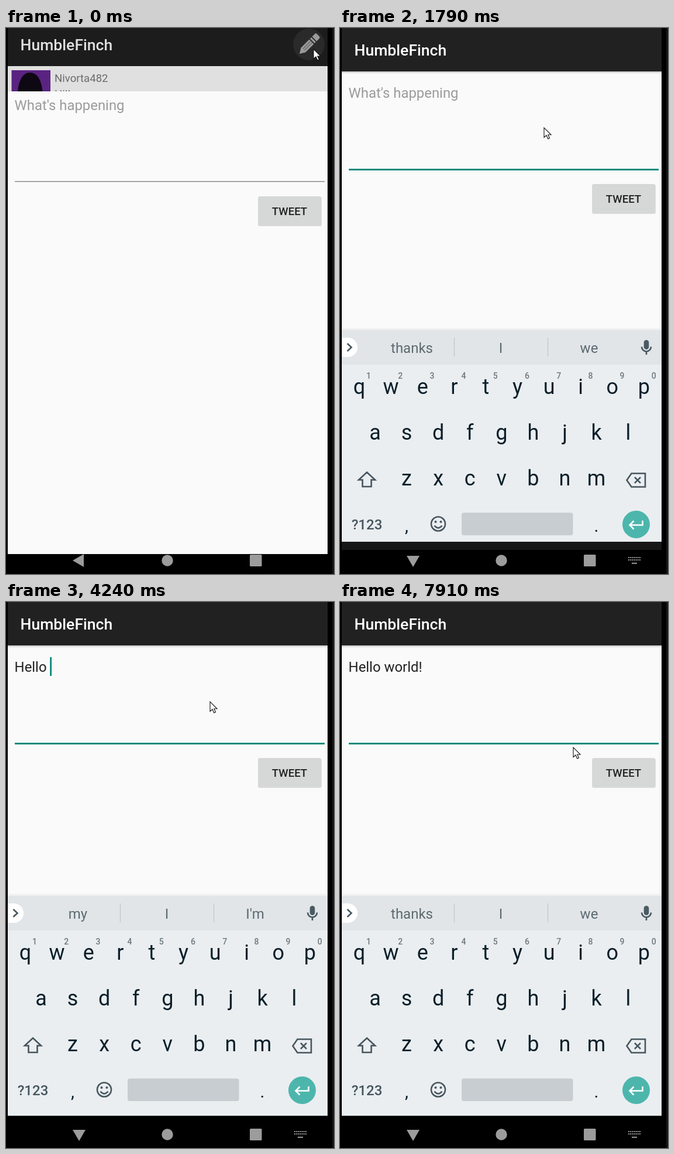
An HTML page for the animation above (8000 ms loop, 561 px wide and 931 px high).

```html
<!DOCTYPE html>
<html lang="en">
<head>
<meta charset="utf-8">
<title>Compose</title>
<style>
  html, body { margin: 0; width: 100%; height: 100%; overflow: hidden; background: #000; }
  svg { display: block; width: 100%; height: 100%; }
  text { font-family: Roboto, "Open Sans", sans-serif; white-space: pre; }
  .mid { text-anchor: middle; }
  .title { font-size: 26.6px; font-weight: 500; fill: #fff; }
  .body { font-size: 23.9px; }
  .small { font-size: 18.6px; }
  .key { font-size: 36px; fill: #0b1f29; }
  .digit { font-size: 14px; font-weight: 500; fill: #6b777d; }
  .hint { font-size: 24px; fill: #5c6a70; }
  .hint.best { font-weight: 700; fill: #000; }
  .line { fill: none; stroke: #47565e; stroke-width: 2.6; }
</style>
</head>
<body>
<svg viewBox="0 0 561 931" preserveAspectRatio="none">
  <defs>
    <clipPath id="reveal"><rect id="revealBox" x="0" width="561" height="931"/></clipPath>
    <clipPath id="screen"><rect x="3" width="547" height="931"/></clipPath>
    <linearGradient id="fade" x2="0" y2="1">
      <stop stop-color="#000" stop-opacity=".22"/>
      <stop offset="1" stop-color="#000" stop-opacity="0"/>
    </linearGradient>
  </defs>
  <rect width="561" height="931"/>

  <g clip-path="url(#screen)">
    <g id="feed">
      <rect x="3" y="65" width="547" height="811" fill="#e0e0e0"/>
      <rect x="3" width="547" height="65" fill="#1c1c1c"/>
      <text class="title" x="24.5" y="38" style="fill:#e0e0e0">HumbleFinch</text>
      <circle cx="518" cy="28" r="27" fill="#2a2a2a"/>
      <g transform="translate(502 44) rotate(-45)" fill="#9a9a9a">
        <path d="M0 0L9-5.5H29V5.5H9zM31-5.5h3v11h-3zM36-5.5h6q3 0 3 3v5q0 3-3 3h-6z"/>
        <path d="M10-1.8H29M10 1.8H29" stroke="#555"/>
      </g>
      <rect x="9.5" y="72" width="66.5" height="66" fill="#5a2382"/>
      <path d="M20 138C17 100 24 76 41 76S66 100 62 138z" fill="#0d0812"/>
      <text class="small" x="83" y="92" fill="#6c6c6c">Nivorta482</text>
      <text class="small" x="83" y="119" fill="#6c6c6c">Hi!!</text>
    </g>

    <g id="page"><g clip-path="url(#reveal)">
      <rect x="3" width="547" height="876" fill="#fafafa"/>
      <rect x="3" y="74" width="547" height="4" fill="url(#fade)"/>
      <rect x="3" width="547" height="74" fill="#212121"/>
      <text class="title" x="24.5" y="47">HumbleFinch</text>
      <text class="body" id="ask" x="14.6" y="119.3" fill="#9b9b9b">What's happening</text>
      <text class="body" id="typed" x="14.6" y="119.3" fill="#212121"></text>
      <rect id="under" y="121.3" height="1.4" fill="#212121"/>
      <rect id="caret" y="94" width="2.7" height="32" fill="#008577"/>
      <rect id="rule" x="15" width="530"/>
      <rect x="431" y="267" width="109" height="50" rx="3" fill="#000" opacity=".12"/>
      <rect x="431.5" y="266" width="107.5" height="49.5" rx="2.7" fill="#d6d7d7"/>
      <text class="small mid" x="485" y="297.7" font-weight="500" fill="#212121">TWEET</text>
    </g></g>

    <g id="board">
      <rect x="3" y="498" width="547" height="3" fill="#000" opacity=".04"/>
      <rect x="3" y="501" width="547" height="375" fill="#eaeef1"/>
      <rect x="3" y="501" width="547" height="59" fill="#e1e5e8"/>
      <path d="M3 514H13.500a16.500 16.500 0 0 1 0 33H3z" fill="#fff"/>
      <path class="line" d="M12.500 524l7 6.500-7 6.500"/>
      <path d="M195.500 514v32M355.500 514v32" stroke="#c4c9cd" stroke-width="1.4"/>
      <rect x="519.700" y="518" width="8.600" height="16" rx="4.300" fill="#4a5b64"/>
      <path class="line" d="M516 529.500a8 8 0 0 0 16 0M524 537.500v5.500" stroke-width="2.200"/>
      <g id="keys"></g>
      <path class="line" d="M46 743.500L60 756.500H53.500V768H38.500V756.500H32z"/>
      <path class="line" d="M490.500 757L498.500 745.500H522V768.500H498.500zM504 752l10 10M514 752l-10 10"/>
      <text class="hint mid" x="46" y="840.500" style="font-weight:500;fill:#47565e">?123</text>
      <text class="mid" x="114" y="845" font-size="30" fill="#0b1f29">,</text>
      <text class="mid" x="438.500" y="845" font-size="30" fill="#0b1f29">.</text>
      <circle class="line" cx="168" cy="831.500" r="12"/>
      <path class="line" d="M161.500 834.500q6.500 8 13 0"/>
      <g fill="#47565e"><circle cx="163.500" cy="828" r="2"/><circle cx="172.500" cy="828" r="2"/></g>
      <rect x="208" y="812.500" width="190.500" height="38.500" rx="4" fill="#c8cdd1"/>
      <circle cx="506.500" cy="832.500" r="23.500" fill="#4db6ac"/>
      <path d="M517.500 826v7.500H496M502.500 826.500l-7 7 7 7" fill="none" stroke="#fff" stroke-width="2.600"/>
    </g>
    <rect id="veil" x="3" y="594" width="547" height="282" fill="#fafafa"/>
    <rect id="scrim" x="3" y="876" width="547" height="55"/>
  </g>

  <g fill="#fff" opacity=".61">
    <path id="back"/>
    <circle cx="276" cy="908" r="9.700"/>
    <rect x="417" y="898" width="20.500" height="20" rx="1.500"/>
    <path id="dots" fill="none" stroke="#fff" stroke-width="2"/>
  </g>
  <rect x="558" width="3" height="931" fill="#161616"/>
  <path id="mouse" d="M0 0V16.500L4 13L6.800 19L9.500 17.800L6.800 12H12z" fill="#fff" stroke="#111" stroke-width="1.100"/>
</svg>

<script>
const $ = id => document.getElementById(id);
const set = (id, attrs) => { for (const k in attrs) $(id).setAttribute(k, attrs[k]); };
const show = (id, on) => set(id, { visibility: on ? 'visible' : 'hidden' });

const LOOP = 8000, LEFT = 14.6, STEP = 54.1;

// Keyboard letters, corner digits and the three suggestions
let keys = '';
const label = (cls, x, y, s) => keys += `<text class="${cls} mid" x="${x}" y="${y}">${s}</text>`;
['qwertyuiop', 'asdfghjkl', 'zxcvbnm'].forEach((row, r) =>
  [...row].forEach((c, i) => label('key', [33, 60, 114][r] + STEP * i, 610 + 78 * r, c)));
for (let i = 0; i < 10; i++) label('digit', 49 + STEP * i + i * .1, 583.5, (i + 1) % 10);
for (const x of [123, 275, 426]) label('hint', x, 540, '');
$('keys').innerHTML = keys;
const hints = document.querySelectorAll('#keys .hint');

let dots = 'M499 912.800h9';
for (let y = 903; y < 909; y += 4)
  for (let i = 0; i < 7; i++) dots += `M${493 + i * 3.15} ${y}h2`;
set('dots', { d: dots });

// Each step keeps the values of the one before; word = start of the underlined word
const steps = [
  [0, { y: 21, clip: 87, mouse: [526, 36], typed: '', word: -1, caret: 0, focus: 0,
        board: -1, veil: 0, scrim: 0, down: 0, hints: 'thanks I we', best: 0 }],
  [120, { y: 4, clip: 3, mouse: [522, 40] }],
  [270, { y: 1, clip: 0, mouse: [490, 68] }],
  [390, { y: 0, mouse: [432, 111] }],
  [540, { mouse: [352, 167] }],
  [690, { mouse: [349, 170] }],
  [810, { focus: 1 }],
  [930, { caret: 1 }],
  [1490, { caret: 0, down: 1 }],
  [1650, { board: 94, veil: .5, scrim: .52 }],
  [1790, { board: 14, veil: 0, scrim: .9 }],
  [1910, { board: 0, scrim: 1, caret: 1 }],
  [2340, { typed: 'H', word: 0, hints: 'H Hi He', best: 1 }],
  [2650, { typed: 'He' }],
  [2800, { hints: 'He Hey Hello' }],
  [2950, { typed: 'Hel', hints: 'Hel Hello Help' }],
  [3100, { typed: 'Hell', hints: "Hell Hello He'll" }],
  [3350, { typed: 'Hello', hints: 'Hello Hello Hellos' }],
  [3960, { typed: 'Hello ', word: -1 }],
  [4240, { hints: "my I I'm", best: 0 }],
  [4670, { typed: 'Hello w', word: 6, hints: 'w we want', best: 1 }],
  [4980, { typed: 'Hello wo', hints: "wo would won't" }],
  [5130, { typed: 'Hello wor', hints: 'wor work working' }],
  [5400, { typed: 'Hello worl', hints: 'worl world work' }],
  [5520, { typed: 'Hello world', hints: 'world world worlds' }],
  [5950, { caret: 0 }],
  [6500, { typed: 'Hello world!', word: -1, caret: 1, hints: 'thanks I we', best: 0 }],
  [6930, { caret: 0 }],
  [7520, { caret: 1, mouse: [365, 192] }],
  [7640, { mouse: [391, 233] }],
  [7790, { mouse: [398, 245] }],
  [7910, { caret: 0, mouse: [399, 248] }]
];

function textWidth(s) {
  $('typed').textContent = s;
  return s ? $('typed').getComputedTextLength() : 0;
}

function draw(s) {
  set('feed', { transform: `translate(0 ${s.y < 21 ? -8 : 0})` });
  set('page', { transform: `translate(0 ${s.y})` });
  set('revealBox', { y: s.clip });
  set('mouse', { transform: `translate(${s.mouse})` });

  const start = s.word < 0 ? 0 : textWidth(s.typed.slice(0, s.word));
  const end = textWidth(s.typed);
  set('under', { x: LEFT + start, width: end - start });
  set('caret', { x: LEFT + end - .2 });
  show('under', s.word >= 0);
  show('caret', s.caret);
  show('ask', !s.typed);
  set('rule', s.focus ? { y: 240, height: 2.8, fill: '#008577' }
                      : { y: 240, height: 1.4, fill: '#868686' });

  show('board', s.board >= 0);
  set('board', { transform: `translate(0 ${s.board})` });
  set('veil', { opacity: s.veil });
  set('scrim', { opacity: s.scrim });
  s.hints.split(' ').forEach((word, i) => {
    hints[i].textContent = word;
    hints[i].classList.toggle('best', i === 1 && !!s.best);
  });

  set('back', { d: s.down ? 'M114 900H136L125 919z' : 'M114 908L133 897V919z' });
  show('dots', s.down);
}

let shown = -1;
function frame(now) {
  const t = now % LOOP;
  const past = steps.filter(([at]) => at <= t);
  if (past.length !== shown) {
    shown = past.length;
    draw(Object.assign({}, ...past.map(([, change]) => change)));
  }
  requestAnimationFrame(frame);
}
const begin = performance.now();
const tick = now => Math.max(0, now - begin);
requestAnimationFrame(function run(now) {
  frameAt(tick(now));
  requestAnimationFrame(run);
});
function frameAt(ms) {
  const past = steps.filter(([at]) => at <= ms % LOOP);
  if (past.length === shown) return;
  shown = past.length;
  draw(Object.assign({}, ...past.map(([, change]) => change)));
}
</script>
</body>
</html>
```
